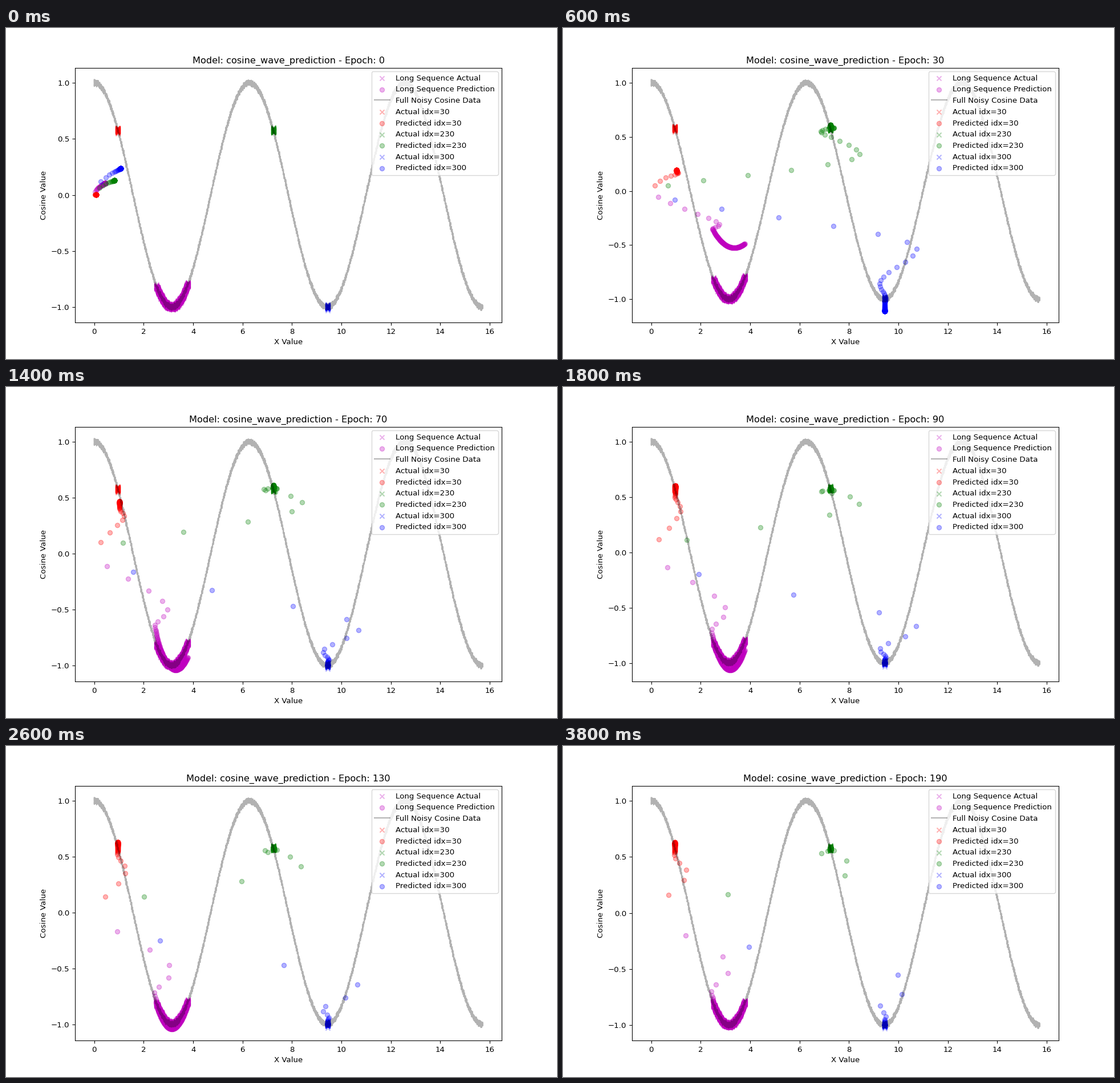
A matplotlib script for the animation above (4 s loop, 966 by 580 pixels).

```python
import numpy as np
import matplotlib.pyplot as plt
from matplotlib.animation import FuncAnimation

FRAMES, INTERVAL, EPOCH_STEP = 20, 200, 10
WARMUP = 30
STEP = np.pi / 100
T = np.arange(1, 151)
TOP, FLOOR = 1.031, -1.035
DPI = 96.6

rng = np.random.default_rng(7)


def learn(epoch, tau):
    return 1 - np.exp(-epoch / tau)


def bump(epoch, centre, width):
    return np.exp(-((epoch - centre) / width) ** 2)


def settle(over, rise, ring, decay, power):
    """Ease up to an overshoot, then a damped swing around 1."""
    up = (1 + over) * np.sin(np.pi / 2 * np.minimum(T / rise, 1) ** power) ** 2
    v = np.maximum(T - rise, 0) / ring
    k = -np.log(decay)
    swing = np.cos(np.pi * v) + k / np.pi * np.sin(np.pi * v)
    return np.where(T < rise, up, 1 + over * np.exp(-k * v) * swing)


def climb(level, slope, sharpness):
    """Start with the given slope and saturate at the level."""
    z = slope * T / abs(level)
    return level * z / (1 + z ** sharpness) ** (1 / sharpness)


def red(e):
    x = (.95 + .12 * bump(e, 50, 30)) * settle(
        .0029 * e - .03, 1 / (.093 + .0015 * e), 1 / (.2 + .00045 * e), .05, .73)
    level = min(.0065 * e - .01, .6)
    return x, climb(level, .19 * learn(e, 90), 2) + .05 * level * T / T[-1]


def green(e):
    x = 7.26 * settle(.16, 1 / (.092 + .0017 * e), 1 / (.07 + .0026 * e),
                      .35, min(.85 + .0009 * e, 1))
    level = .56 + .06 * bump(e, 50, 20)
    return x, climb(level, .203 * learn(e, 110), 6) + .05 * level * T / T[-1]


def blue(e):
    x = 9.45 * settle(.135, 1 / (.092 + .0017 * e), 1 / (.06 + .0027 * e),
                      .16, min(.82 + .001 * e, 1))
    return x, climb(-1 - .11 * bump(e, 30, 8), .4 * learn(e, 130), 2.5)


def purple(e):
    """Approach the left end of a bowl, then follow it to the right."""
    u = e - WARMUP
    left, right = 2.5, 3.78
    bottom = -1.01 + .485 * (1 - u / 32) * np.exp(-u / 29)
    middle = 3.14 + .26 * bump(e, 45, 35)
    curve = .53 - .32 * np.exp(-u / 20)
    run = (right - left) * np.clip((T - 12) / (T[-1] - 12), 0, 1)
    arc = bottom + curve * (left + run - middle) ** 2
    x = left * settle(.3 * learn(e, 75), 1 / (.093 + .0015 * e),
                      1 / (.22 + .001 * e), .12, .8)
    y = climb(arc[0], .25 * learn(e, 115), 3)
    return x + run, y + arc - arc[0]


def predict(epoch, model, x0, y0, pace):
    """Blend from the untrained path; x is learned sooner than y."""
    x, y = model(max(epoch, WARMUP))
    b = min(epoch / WARMUP, 1)
    start = learn(T, pace)
    wx, wy = b ** .6, b ** 2
    return (x0 * start * (1 - wx) + x * wx,
            y0 * np.sqrt(start) * (1 - wy) + y * wy)


def noisy_cos(x, copies):
    x = np.repeat(x, copies)
    noise = np.clip(rng.normal(0, .01, x.size), -.031, .031)
    return x, np.cos(x) + noise


# Colour, labels, sample indices, copies, model and its untrained end and pace
SERIES = [
    ("m", "Long Sequence Actual", "Long Sequence Prediction",
     np.arange(80, 121), 50, (purple, .44, .105, 12)),
    ("r", "Actual idx=30", "Predicted idx=30", 30, 100, (red, .08, .003, 3.5)),
    ("g", "Actual idx=230", "Predicted idx=230", 230, 100, (green, .82, .13, 3.5)),
    ("b", "Actual idx=300", "Predicted idx=300", 300, 100, (blue, 1.06, .235, 3.5)),
]

fig, ax = plt.subplots(figsize=(966 / DPI, 580 / DPI), dpi=DPI)

dots, handles = [], []
for color, actual, predicted, idx, copies, model in SERIES:
    style = dict(color=color, alpha=.3)
    crosses = ax.scatter(*noisy_cos((idx + .5) * STEP, copies), marker="x",
                         label=actual, **style)
    dot = ax.scatter([], [], marker="o", label=predicted, **style)
    dots.append((dot, model))
    handles += [crosses, dot]

line, = ax.plot(*noisy_cos(np.linspace(0, 5 * np.pi, 500), 60), "k-",
                alpha=.3, label="Full Noisy Cosine Data")
handles.insert(2, line)

pad = .05 * 5 * np.pi
ax.set_xlim(-pad, 5 * np.pi + pad)
ax.set_xlabel("X Value")
ax.set_ylabel("Cosine Value")
ax.legend(handles=handles, loc="upper right")
title = ax.set_title("")


def update(i):
    epoch = i * EPOCH_STEP
    low = FLOOR
    for dot, model in dots:
        x, y = predict(epoch, *model)
        dot.set_offsets(np.column_stack([x, y]))
        low = min(low, y.min())
    margin = .05 * (TOP - low)
    ax.set_ylim(low - margin, TOP + margin)
    title.set_text(f"Model: cosine_wave_prediction - Epoch: {epoch}")
    return [dot for dot, _ in dots] + [title]


anim = FuncAnimation(fig, update, frames=FRAMES, interval=INTERVAL,
                     repeat=True, repeat_delay=0, blit=False)
plt.show()
```
